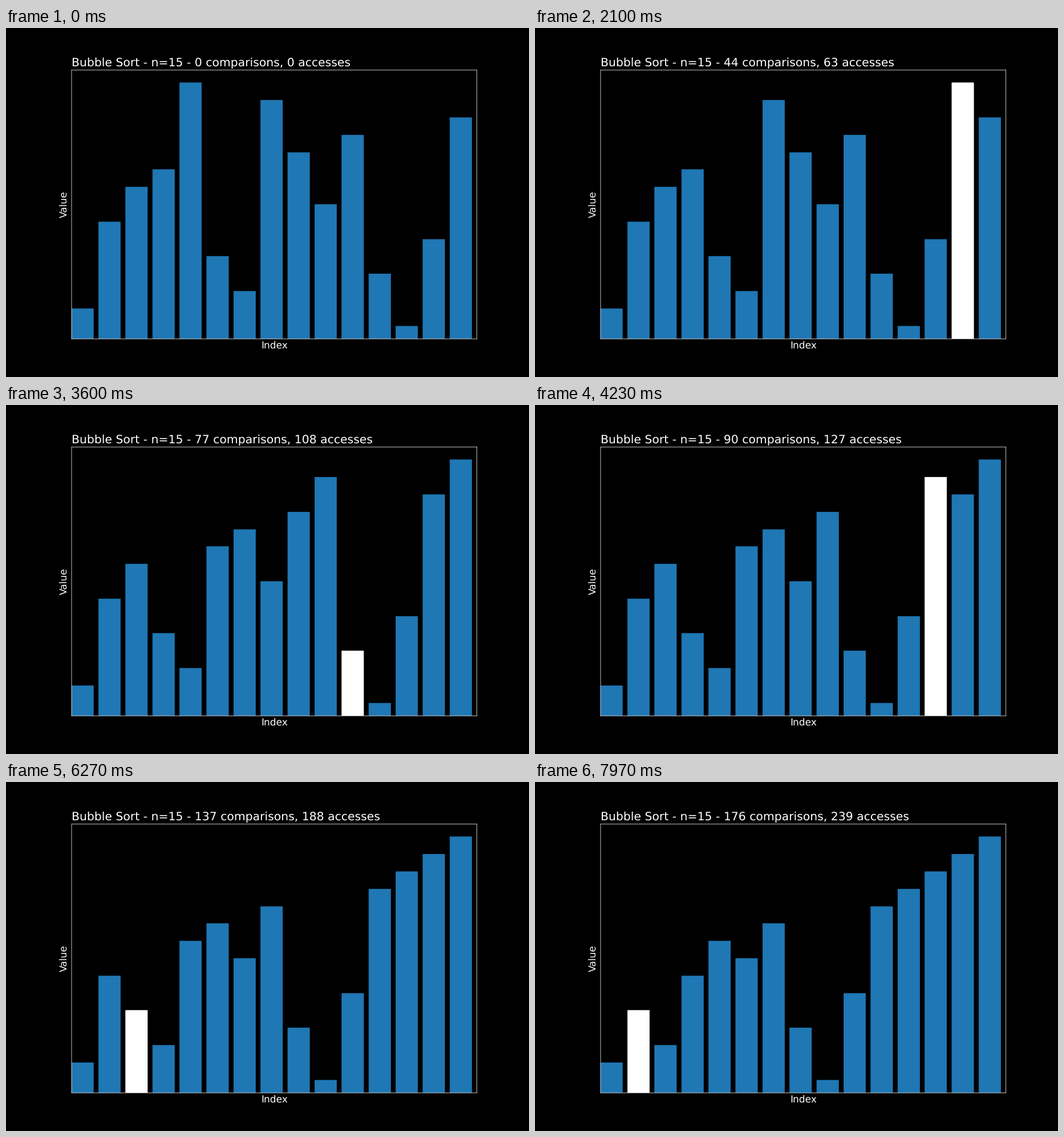
Animation, 917 px wide and 611 px high, one loop 8 s. Source, as a matplotlib script:

```python
import matplotlib.pyplot as plt
import numpy as np
from matplotlib.animation import FuncAnimation

N = 15
LOOP_MS = 8000
TICK_MS = 20
STEPS_PER_SECOND = 30
STEP_COUNT = LOOP_MS * STEPS_PER_SECOND // 1000

# The layout lives on a 1200 x 800 grid that is scaled down to the stage.
GRID_W, GRID_H = 1200, 800
DPI = 100 * 611 / GRID_H
HAIRLINE = 0.72
PLOT_H = 616

BLUE, RED, WHITE = "#1f77b4", "#ff0000", "#ffffff"

ORDER = [2, 7, 9, 10, 15, 5, 3, 14, 11, 8, 12, 4, 1, 6, 13]
LEVELS = np.round(np.linspace(50, 1000, N) * PLOT_H / 1050)


def bubble_sort(arr):
    """Yield (kind, index) after every single read or write of the array."""
    for _ in range(N):
        for j in range(N - 1):
            yield "get", j
            yield "get", j + 1
            if arr[j] > arr[j + 1]:
                yield "get", j
                yield "get", j + 1
                left = arr[j]
                arr[j] = arr[j + 1]
                yield "set", j
                arr[j + 1] = left
                yield "set", j + 1


def record():
    """List the state of the chart at each step: heights, access, read count."""
    arr = [LEVELS[rank - 1] for rank in ORDER]
    steps = [(arr[:], None, None, 0)]
    reads = 0
    for kind, index in bubble_sort(arr):
        steps.append((arr[:], kind, index, reads))
        reads += kind == "get"
        if len(steps) == STEP_COUNT:
            break
    return steps


STEPS = record()

plt.rcParams.update({
    "font.family": "DejaVu Sans",
    "font.size": 16,
    "text.color": WHITE,
    "text.hinting": "none",
    "path.snap": False,
    "axes.labelcolor": WHITE,
    "axes.edgecolor": WHITE,
    "axes.linewidth": HAIRLINE,
    "axes.facecolor": "black",
    "figure.facecolor": "black",
    "savefig.facecolor": "black",
})

fig, ax = plt.subplots(figsize=(917 / DPI, 611 / DPI), dpi=DPI)
# Half a grid unit centres the lines on grid cells.
fig.subplots_adjust(left=150.5 / GRID_W, right=1080.5 / GRID_W,
                    bottom=1 - 712.5 / GRID_H, top=1 - 96.5 / GRID_H)
bars = ax.bar(range(N), STEPS[0][0], width=50 / 62, align="edge",
              linewidth=HAIRLINE)
ax.set(xlim=(0, N), ylim=(0, PLOT_H), xticks=[], yticks=[],
       xlabel="Index", ylabel="Value")
title = ax.set_title("", loc="left")


def draw(tick):
    # A step that begins within a tick is shown for that whole tick.
    step = (tick * TICK_MS + 15) * STEPS_PER_SECOND // 1000
    heights, kind, index, reads = STEPS[step]
    for i, (bar, height) in enumerate(zip(bars, heights)):
        bar.set_height(height)
        bar.set_color(BLUE if i != index else WHITE if kind == "get" else RED)
    title.set_text(f"Bubble Sort - n={N} - {reads} comparisons, {step} accesses")
    return [*bars, title]


anim = FuncAnimation(fig, draw, frames=LOOP_MS // TICK_MS,
                     init_func=lambda: draw(0), interval=TICK_MS,
                     repeat=True, repeat_delay=0)
plt.show()
```
